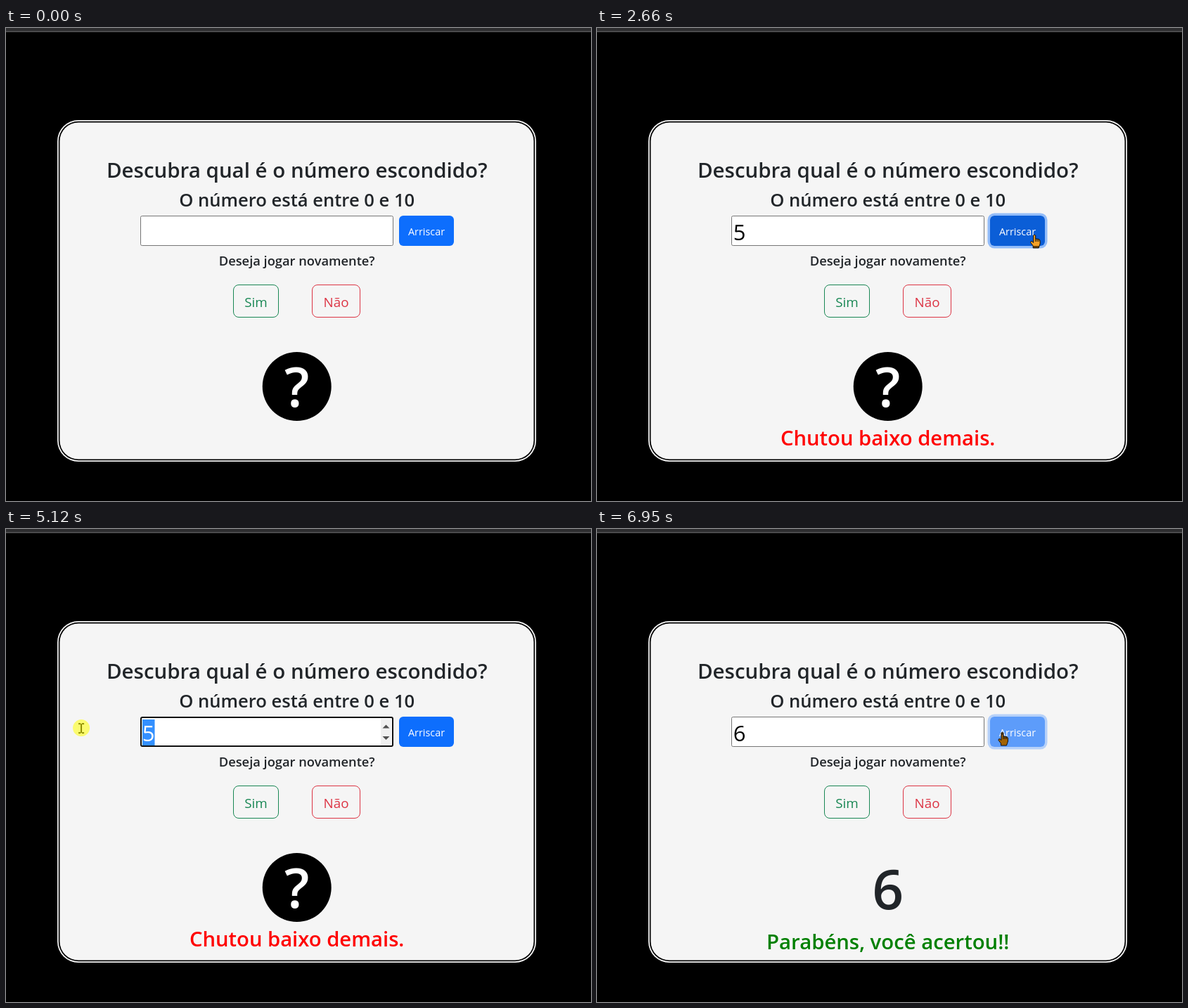
Animation, 832 px wide and 673 px high, one loop 8000 ms. Source, as an HTML page with a canvas:

```html
<!DOCTYPE html>
<html lang="pt-BR">
<head>
<meta charset="utf-8">
<title>Número escondido</title>
<style>
  html, body { margin: 0; width: 100%; height: 100%; overflow: hidden; background: #000; }
  canvas { display: block; }
</style>
</head>
<body>
<canvas id="stage" width="832" height="673"></canvas>
<script>
const ctx = document.getElementById('stage').getContext('2d', { alpha: false });
const LOOP = 8000, FADE = 150;
const FAMILY = '"Open Sans", "Noto Sans", sans-serif';
const INK = '#212529', PAPER = '#f5f5f5', CENTER = 413.7;

const rect = (x, y, w, h) => ({ x, y, w, h });
const inset = (r, d) => rect(r.x + d, r.y + d, r.w - 2 * d, r.h - 2 * d);
const spot = (r, u, v) => ({ x: r.x + r.w * u, y: r.y + r.h * v });
const contains = (r, p) => p.x > r.x && p.x < r.x + r.w && p.y > r.y && p.y < r.y + r.h;

const card = rect(73, 131, 681, 486);
const field = rect(191, 267, 360, 43);
const button = rect(559, 267, 78, 43);

// What the player does, in ms
const click = { field: 1220, guess: 2450, drag: 4490, retry: 6680 };
const release = { field: 1360, guess: 2590, drag: 5230, retry: 6820 };
const typed = { first: 1560, second: 5850 };

const move = (start, end, to) => ({ start, end, to });
const entry = spot(card, 0.93, 0.92);
const moves = [
  move(460, 1000, spot(field, 0.61, 0.56)),
  move(release.field, 1700, spot(card, 0.84, 0.5)),
  move(1850, 2350, spot(button, 0.81, 0.65)),
  move(3420, 3760, spot(field, 0.867, 0.5)),
  move(4840, 5060, spot(card, 0.05, 0.313)),
  move(release.drag, 5590, spot(field, 0.2, 0.5)),
  move(5950, 6420, spot(button, 0.06, 0.79)),
  move(6480, 6620, spot(button, 0.224, 0.535))
];

const within = (t, a, b) => t >= a && t < b;
const ramp = (t, start, length) => Math.min(1, Math.max(0, (t - start) / length));
const smooth = k => k * k * (3 - 2 * k);
const mix = (a, b, k) => a + (b - a) * k;
const fadeInOut = (t, on, off) => ramp(t, on, FADE) - ramp(t, off, FADE);

const dragging = t => within(t, click.drag, release.drag);
const pressed = t => Object.keys(click).some(k => within(t, click[k], release[k]));

function pointerAt(t) {
  let { x, y } = entry;
  for (const { start, end, to } of moves) {
    const k = smooth(ramp(t, start, end - start));
    x = mix(x, to.x, k);
    y = mix(y, to.y, k);
  }
  return { x, y };
}

function box(r, radius, fill, stroke, lineWidth = 1) {
  ctx.beginPath();
  ctx.roundRect(r.x, r.y, r.w, r.h, radius);
  if (fill) { ctx.fillStyle = fill; ctx.fill(); }
  if (stroke) { ctx.strokeStyle = stroke; ctx.lineWidth = lineWidth; ctx.stroke(); }
}

function bar(x, y, w, h, color) {
  ctx.fillStyle = color;
  ctx.fillRect(x, y, w, h);
}

function disc(x, y, radius, color) {
  ctx.beginPath();
  ctx.arc(x, y, radius, 0, Math.PI * 2);
  ctx.fillStyle = color;
  ctx.fill();
}

function text(str, x, y, size, color, weight = 600, align = 'center') {
  ctx.font = `${weight} ${size}px ${FAMILY}`;
  ctx.textAlign = align;
  ctx.fillStyle = color;
  ctx.fillText(str, x, y);
}

function outlineButton(label, x, width, color) {
  box(inset(rect(x, 365, width, 47), 0.5), 7.5, null, color);
  text(label, x + width / 2, 397, 18.8, color, 400);
}

function drawPage() {
  bar(0, 0, 832, 673, '#000');
  bar(0, 0, 832, 4, '#2d2d2f');
  bar(0, 4, 832, 2, '#4a4a4c');

  [PAPER, '#000', PAPER].forEach((color, i) => box(inset(card, i * 1.75), 30 - i * 1.75, color));

  text('Descubra qual é o número escondido?', CENTER, 213, 29.5, INK);
  text('O número está entre 0 e 10', CENTER, 254, 25.6, INK);
  text('Deseja jogar novamente?', CENTER, 338, 18.3, INK);
  outlineButton('Sim', 323, 65, '#198754');
  outlineButton('Não', 435, 69, '#dc3545');
}

function drawSpinner() {
  bar(533, 270, 15, 38, '#f0f0f0');
  ctx.fillStyle = '#505050';
  for (const side of [-1, 1]) {
    ctx.beginPath();
    ctx.moveTo(540.5, 289.3 + side * 10.8);
    ctx.lineTo(535.5, 289.3 + side * 5.8);
    ctx.lineTo(545.5, 289.3 + side * 5.8);
    ctx.fill();
  }
}

function drawField(t, hovered) {
  const focused = within(t, click.field, click.guess) || within(t, click.drag, click.retry);
  const selected = within(t, 5000, typed.second);
  const value = t < typed.first ? '' : t < typed.second ? '5' : '6';

  if (focused) box(inset(field, 1), 2, '#fff', '#101010', 2);
  else box(inset(field, 0.5), 2, '#fff', '#767676');
  if (focused || hovered) drawSpinner();

  if (selected) bar(194, 271, 17.5, 37, '#3390ff');
  text(value, 193.7, 301.5, 31, selected ? '#fff' : '#000', 400, 'left');
  if (focused && !selected) bar(value ? 211 : 194, 271, 1, 37, '#000');
}

function drawButton(t) {
  const solved = t >= release.retry;
  const blur = click.drag + 70;
  const ring = fadeInOut(t, click.guess, blur) + ramp(t, click.retry, FADE);
  const shade = solved ? 0 : fadeInOut(t, 2300, blur) + ramp(t, 6450, FADE);

  ctx.globalAlpha = solved ? 0.65 : 1;
  box(inset(button, -1.75), 8, null, `rgba(49,132,253,${ring * 0.5})`, 3.5);
  box(button, 6, `rgb(${mix(13, 11, shade)},${mix(110, 94, shade)},${mix(253, 215, shade)})`);
  ctx.globalAlpha = 1;
  text('Arriscar', 598, 295, 14.4, '#fff', 400);
}

function drawResult(t) {
  if (t >= release.retry) {
    text('6', CENTER, 540.5, 78, INK);
    text('Parabéns, você acertou!!', CENTER, 598, 29.3, 'green');
    return;
  }
  disc(CENTER, 510, 49, '#000');
  text('?', CENTER, 539, 78, '#fff');
  if (t >= release.guess - 70) text('Chutou baixo demais.', CENTER, 594, 29.2, 'red');
}

const cursors = {
  beam() {
    bar(-1, -6, 2, 13, '#fff');
    for (const x of [-4, 1]) for (const y of [-7, 6]) bar(x, y, 3, 2, '#fff');
  },
  arrow() {
    ctx.fillStyle = '#fff';
    ctx.fill(new Path2D('M0 0V17L4 13 6.5 19 9 18 6.5 12H12Z'));
  },
  hand() {
    const shape = new Path2D(`M-1.5 0Q0-1.5 1.5 0V5Q8 5 8 8V12L6 18H-2V15
      L-5.5 10.5Q-5.5 8-3.5 8.6L-1.5 10.5Z`);
    ctx.fillStyle = '#fff';
    ctx.fill(shape);
    ctx.globalCompositeOperation = 'source-over';
    ctx.strokeStyle = '#111';
    ctx.stroke(shape);
    for (let x = 1.5; x < 7; x += 2.2) bar(x - 0.5, 5, 1, 4, '#111');
  }
};

function pointerKind(t, p) {
  if (dragging(t) || contains(field, p)) return 'beam';
  return contains(button, p) ? 'hand' : 'arrow';
}

// The pointer inverts whatever lies beneath it; a press adds a yellow halo.
function drawPointer(t, p, kind) {
  ctx.save();
  ctx.translate(p.x, p.y);
  ctx.lineWidth = 1;
  ctx.globalCompositeOperation = 'difference';
  cursors[kind]();
  ctx.restore();
  if (pressed(t)) disc(p.x, p.y, 12, 'rgba(255,255,0,.55)');
}

function frame(now) {
  const t = now % LOOP;
  const pointer = pointerAt(t);
  const kind = pointerKind(t, pointer);
  drawPage();
  drawField(t, kind === 'beam');
  drawButton(t);
  drawResult(t);
  if (t >= moves[0].start) drawPointer(t, pointer, kind);
  requestAnimationFrame(frame);
}
requestAnimationFrame(frame);
</script>
</body>
</html>
```
